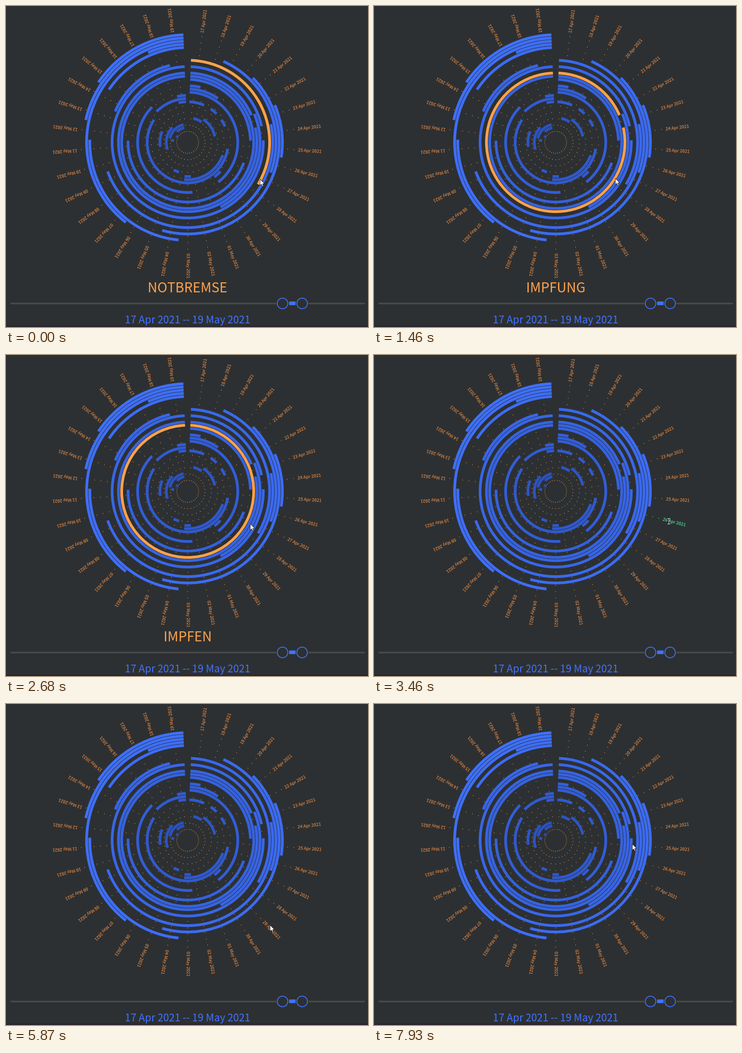
Recreate the animation shown at these times as a matplotlib script. Size 795 px wide and 704 px high, loop 7.99 s.

```python
import numpy as np
import matplotlib.pyplot as plt
from matplotlib.animation import FuncAnimation
from matplotlib.collections import PatchCollection
from matplotlib.colors import to_rgb
from matplotlib.patches import Circle, Polygon, Rectangle, Wedge

W, H, DPI = 795, 704, 100
LOOP, STEP = 7990, 34
TICK = 60  # the pointer is sampled this often, in ms
PX = 72 / DPI  # points per pixel

BG = "#2d3032"
ORANGE = "#ffa24b"
LABEL = "#ff9648"
MINT = "#52ffb4"
BLUE = "#4072ff"
INNER, OUTER = np.array([41, 80, 186]) / 255, np.array([63, 113, 255]) / 255
FONT = "Noto Sans CJK JP"

CX, CY = 399, 299
R0, RING, THICK, RINGS = 26, 7, 6, 31
DAYS, GAP = 33, 2.3
BAND = (360 - 2 * GAP) / DAYS
MIDS = GAP + BAND * (np.arange(DAYS) + 0.5)
LABEL_R, LABEL_END = 243, 296

TITLES = {17: "IMPFEN", 18: "IMPFUNG", 19: "LOCKDOWN", 20: "IMPFSTOFF",
          22: "NOTBREMSE", 23: "AUSGANGSSPERRE", 24: "TESTEN", 25: "REGEN"}


def edge(day):
    return GAP + day * BAND


def polar(r, deg):
    a = np.radians(deg)
    return CX + r * np.sin(a), CY - r * np.cos(a)


def date(day):
    return f"{17 + day:02d} Apr 2021" if day < 14 else f"{day - 13:02d} May 2021"


# Bars as (ring, first day, end day)
bars = []


def add(ring, first, days):
    """A bar that may run past the last day and wrap to the first."""
    end = first + days
    bars.append((ring, first, min(end, DAYS)))
    if end > DAYS:
        bars.append((ring, 0, end - DAYS))


# Main bar of each outer ring: first day, length
MAIN = [(10, 15), (0, 8), (0, 33), (7, 32), (6, 8), (8, 32), (27, 5), (0, 11),
        (7, 16), (2, 8), (4, 14), (28, 5), (17, 8), (20, 13), (26, 7), (28, 5)]
for ring, span in enumerate(MAIN, RINGS - len(MAIN)):
    add(ring, *span)
for bar in [(5, 24, 3), (8, 10, 7), (9, 9, 19), (9, 32, 3), (10, 29, 4),
            (11, 32, 1), (12, 0, 13), (12, 16, 13), (26, 6, 3), (27, 31, 2)]:
    add(*bar)

# Short bars that spiral around the middle
for k in (1, 2, 3):
    add(k, 32 - 3 * k, min(3 * k, 6))
for k in (4, 5):
    add(k, 2 * k - 7, 2 * k - 6)
for k in (13, 14):
    add(k, 0, 29 - 2 * k)
for k in (0, 1, 6, 7, 10):
    add(k, int(27 - 1.5 * k), 1)
for day in (3, 5):
    add(9, day, 1)

# Pointer moves: start, end (ms), destination
START = (558, 380)
MOVES = [
    (120, 300, (530, 378)),
    (730, 910, (535, 382)),
    (1320, 1380, (530, 378)),
    (1670, 1880, (518, 368)),
    (2030, 2380, (526, 371)),
    (2590, 3160, polar(256, MIDS[9])),
    (3440, 3880, polar(256, MIDS[10])),
    (4140, 4410, polar(256, MIDS[11])),
    (4730, 4880, (619, 452)),
    (5170, 5260, polar(256, MIDS[11])),
    (5600, 5800, (580, 485)),
    (5840, 6050, polar(256, MIDS[12])),
    (6200, 6890, (596.5, 300)),
    (7060, 7550, (577, 304)),
    (7720, 7920, (567.3, 307)),
]


def pointer(t):
    pos = np.array(START, float)
    for start, end, goal in MOVES:
        pos += (np.array(goal) - pos) * np.clip((t - start) / (end - start), 0, 1)
    return pos


def hit(x, y):
    """Ring and day label under a point, -1 where there is none."""
    dx, dy = x - CX, y - CY
    r, deg = np.hypot(dx, dy), np.degrees(np.arctan2(dx, -dy)) % 360
    day = (deg - GAP) / BAND
    for ring, first, end in bars:
        if abs(r - R0 - ring * RING) <= THICK / 2 and first <= day < end:
            return ring, -1
    if LABEL_R < r < LABEL_END:
        near = int(np.argmin(abs(MIDS - deg)))
        if abs(r * np.sin(np.radians(MIDS[near] - deg))) < 4.5:
            return -1, near
    return -1, -1


fig = plt.figure(figsize=(W / DPI, H / DPI), dpi=DPI, facecolor=BG)
ax = fig.add_axes([0, 0, 1, 1])
ax.set_xlim(0, W)
ax.set_ylim(H, 0)
ax.axis("off")


def write(x, y, text, size, color, **kw):
    return ax.text(x, y, text, fontsize=size * PX, color=color, family=FONT,
                   weight="light", va="baseline", **kw)


# Radial dots and date labels
radii = R0 - 2 + 2 * RING * np.arange(16)
dot_x, dot_y = polar(radii[None, :], MIDS[:, None])
dot_day = np.repeat(np.arange(DAYS), len(radii))
dots = ax.scatter(dot_x.ravel(), dot_y.ravel(), s=(1.5 * PX) ** 2,
                  c=ORANGE, linewidths=0, zorder=1)

labels = []
for day, deg in enumerate(MIDS):
    x, y = polar(LABEL_R, deg)
    a = np.radians(deg)
    labels.append(write(x + 3.3 * np.cos(a), y + 3.3 * np.sin(a), date(day),
                        9.5, LABEL, ha="left", rotation=90 - deg,
                        rotation_mode="anchor", zorder=3))

# Bars, brighter towards the rim
wedges = [Wedge((CX, CY), R0 + ring * RING + THICK / 2,
                edge(first) - 90, edge(end) - 90, width=THICK)
          for ring, first, end in bars]
bar_ring = np.array([bar[0] for bar in bars])
bar_colors = INNER + (OUTER - INNER) * (bar_ring / (RINGS - 1))[:, None]
bar_art = PatchCollection(wedges, facecolors=bar_colors, linewidths=0, zorder=2)
ax.add_collection(bar_art)

# Slider and captions
ax.add_patch(Rectangle((0, 701), W, 3, color="#28242c", lw=0))
ax.plot([11, 786], [652, 652], color="#4b4b4b", lw=3.4 * PX, zorder=2)
for x in (607.3, 650.3):
    ax.add_patch(Circle((x, 652.3), 14, fc=BG, lw=0, zorder=3))
    ax.add_patch(Circle((x, 652.3), 11.6, fc=BG, ec=BLUE, lw=1.8 * PX, zorder=4))
ax.add_patch(Rectangle((621.8, 648), 14.4, 8, fc=BLUE, lw=0, zorder=5))
write(CX, 696, f"{date(0)} -- {date(DAYS - 1)}", 22.6, BLUE, ha="center")
title = write(CX, 628, "", 29.4, ORANGE, ha="center")

# Pointers: an arrow, and a text beam over labels
ARROW = np.array([(0, 0), (0, 13.6), (3.1, 10.8), (5.2, 15.5),
                  (7.4, 14.5), (5.4, 10), (9.6, 9.6)])
arrow = ax.add_patch(Polygon(ARROW, fc="white", ec="#15171a", lw=0.8 * PX,
                             joinstyle="round", zorder=9))
BEAM = np.array([(-3, -6), (3, -6), (0, -6), (0, 6), (-3, 6), (3, 6)])
beams = [ax.plot([], [], color=color, lw=width * PX, zorder=9)[0]
         for color, width in (("#15171a", 2.4), ("#e8e8e8", 1.1))]


def draw(i):
    t = (i + 0.5) * STEP
    t -= t % TICK
    pos = pointer(t)
    ring, day = hit(*pointer(t - TICK))  # the highlight trails the pointer

    colors = bar_colors.copy()
    colors[bar_ring == ring] = to_rgb(ORANGE)
    bar_art.set_facecolor(colors)
    title.set_text(TITLES.get(ring, ""))
    dots.set_facecolor([MINT if d == day else ORANGE for d in dot_day])
    for d, label in enumerate(labels):
        label.set_color(MINT if d == day else LABEL)

    on_text = day >= 0
    arrow.set_visible(not on_text)
    arrow.set_xy(ARROW + pos)
    for beam in beams:
        beam.set_visible(on_text)
        beam.set_data(*(BEAM + pos).T)
    return []


anim = FuncAnimation(fig, draw, frames=LOOP // STEP, interval=STEP,
                     init_func=lambda: draw(0), repeat=True, repeat_delay=0)
plt.show()
```
